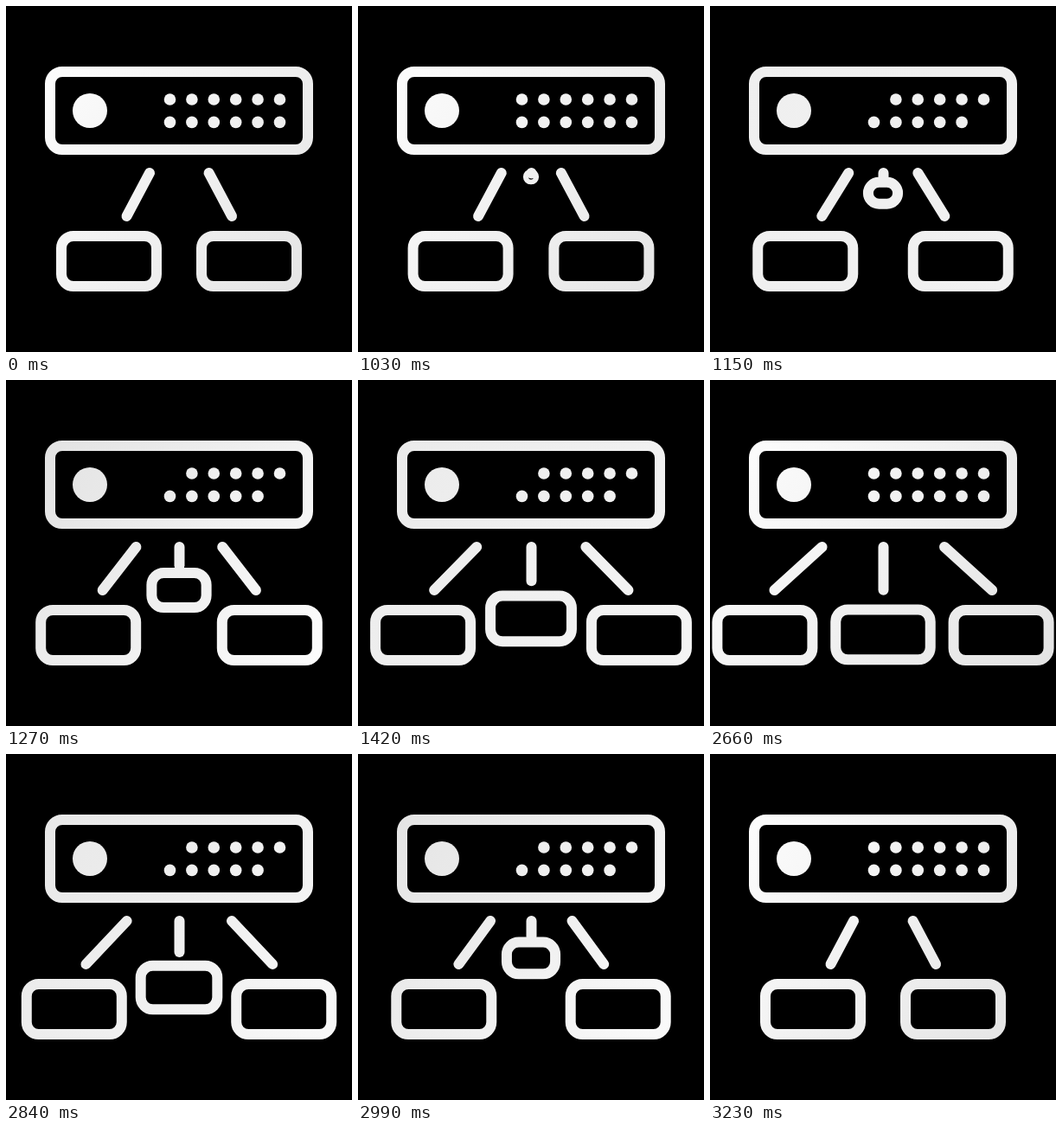
These frames come from a looping animation (400x400 px, 3.26 s). An HTML page:

```html
<!DOCTYPE html>
<html lang="en">
<head>
<meta charset="utf-8">
<title>Server nodes</title>
<style>
  html, body { margin: 0; width: 100%; height: 100%; overflow: hidden; background: #000; }
  svg { display: block; width: 100vw; height: 100vh; }
  .stroke { fill: none; stroke: url(#sheen); stroke-width: 12; stroke-linecap: round; }
  .fill { fill: url(#sheen); }
</style>
</head>
<body>
<svg viewBox="0 0 400 400">
  <defs>
    <linearGradient id="sheen" gradientUnits="userSpaceOnUse" x1="0" y1="60" x2="400" y2="340">
      <stop id="near" offset="0"/>
      <stop id="far" offset="1"/>
    </linearGradient>
  </defs>
  <rect class="stroke" x="51" y="76" width="298" height="90" rx="14"/>
  <circle class="fill" cx="97" cy="121" r="20"/>
  <g id="lights" class="fill"></g>
  <g class="stroke">
    <path id="leftLink"/>
    <path id="rightLink"/>
    <rect id="leftNode" y="266" width="110" height="58" rx="14"/>
    <rect id="rightNode" y="266" width="110" height="58" rx="14"/>
    <g id="middle">
      <path id="middleLink"/>
      <rect id="middleNode"/>
    </g>
  </g>
</svg>
<script>
const LOOP = 3260, STEP = 30, STEPS = 20;
const OPEN_AT = 1000, CLOSE_AT = 2630;
const $ = id => document.getElementById(id);
const set = (id, attrs) => {
  for (const name in attrs) $(id).setAttribute(name, attrs[name]);
};
const mix = (a, b, p) => a + (b - a) * p;
const clamp = v => Math.min(1, Math.max(0, v));
const phase = (t, start) => clamp(Math.floor((t - start) / STEP + 1e-6) / STEPS);

// Cubic ease with a chosen starting speed and a soft landing.
const ease = (x, speed = 0) => x * x * (3 - 2 * x) + speed * x * (1 - x) ** 2;
const grey = v => `rgb(${[v, v, v].map(Math.round).join()})`;

const lights = [];
for (let row = 0; row < 2; row++) {
  for (let col = 0; col < 6; col++) {
    const dot = document.createElementNS("http://www.w3.org/2000/svg", "circle");
    dot.setAttribute("cx", 189.5 + col * 25.4);
    dot.setAttribute("cy", 108 + row * 26.4);
    dot.setAttribute("r", 6.8);
    $("lights").append(dot);
    lights.push(dot);
  }
}
const blinking = [lights[0], lights[11]];

function draw(t) {
  const opening = phase(t, OPEN_AT), closing = phase(t, CLOSE_AT);
  const x = opening - closing;
  const p = ease(x);

  // Side nodes and their links
  const top = mix(34.3, 71, p), bottom = mix(60.8, 126.3, p);
  set("leftLink", { d: `M${200.3 - top} 193L${200.3 - bottom} 243` });
  set("rightLink", { d: `M${200.3 + top} 193L${200.3 + bottom} 243` });
  set("leftNode", { x: mix(64, 8, p) });
  set("rightNode", { x: mix(226, 282, p) });

  // Middle node grows out of the server
  const w = 110 * ease(x, 1.1), h = 58 * ease(x, 1.95);
  const cy = mix(195, 295, ease(x, 0.4));
  set("middle", { visibility: x > 0 ? "visible" : "hidden" });
  set("middleLink", { d: `M200.5 193V${mix(193.1, 243, p)}` });
  set("middleNode", {
    x: 200 - w / 2, y: cy - h / 2, width: w, height: h,
    rx: Math.min(14, w / 2, h / 2)
  });

  // Sheen swings across and back during each move
  const swing = (1 - Math.cos(2 * Math.PI * x)) / 2;
  $("near").style.stopColor = grey(mix(255, 223, swing));
  $("far").style.stopColor = grey(mix(226, 255, swing));

  const step = closing > 0 ? closing : opening;
  const off = step > 0.2 && step < (closing > 0 ? 0.94 : 0.86);
  for (const dot of blinking) dot.setAttribute("visibility", off ? "hidden" : "visible");
}

function tick() {
  draw(performance.now() % LOOP);
  requestAnimationFrame(tick);
}
tick();
</script>
</body>
</html>
```
